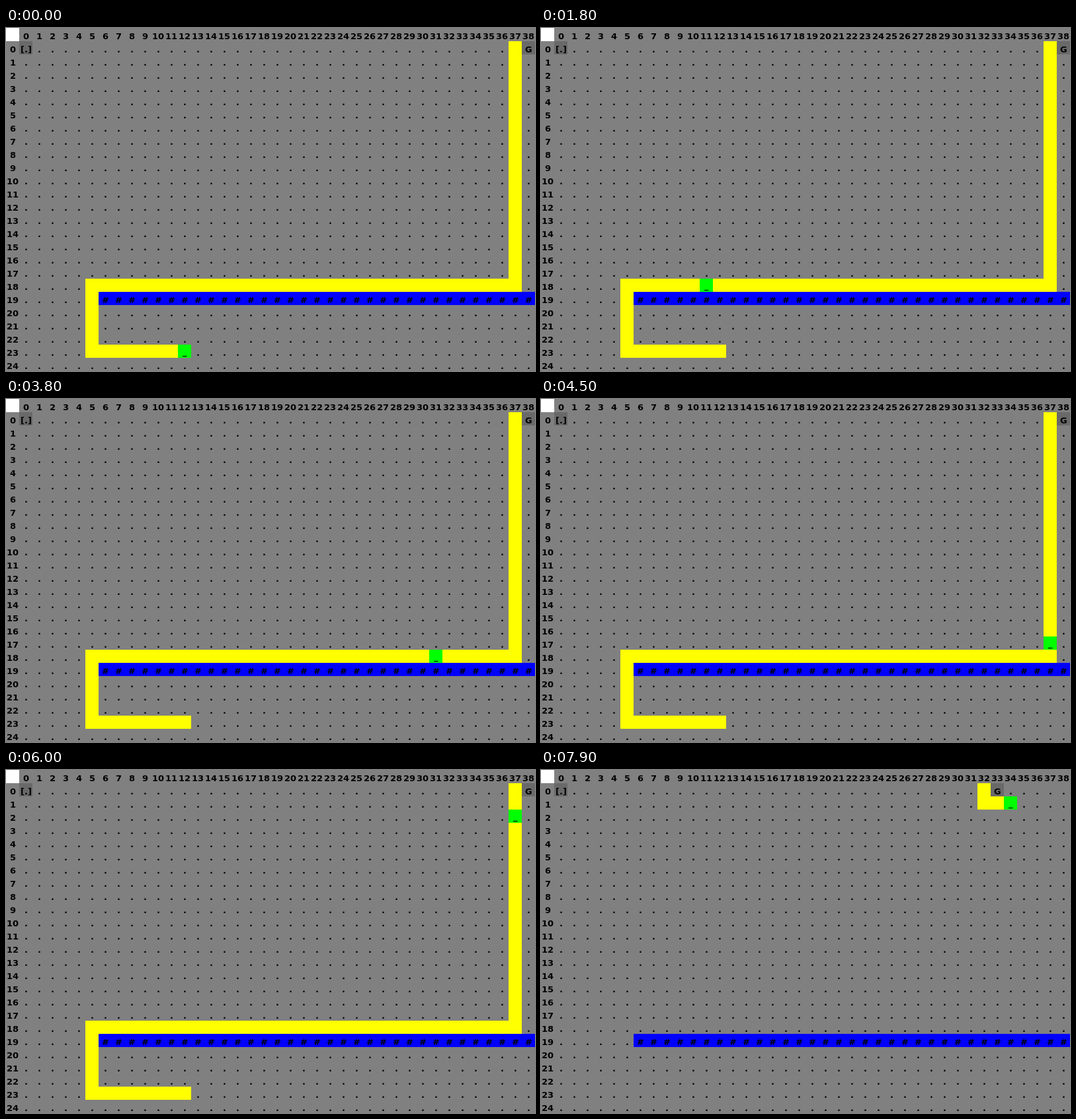
An HTML page with a canvas for the animation above (8 s loop, 800 px wide and 520 px high).

```html
<!DOCTYPE html>
<html>
<head>
<meta charset="utf-8">
<style>
html, body { margin: 0; width: 800px; height: 520px; overflow: hidden; }
canvas { display: block; }
</style>
</head>
<body>
<canvas id="stage" width="800" height="520"></canvas>
<script>
const ctx = document.getElementById('stage').getContext('2d');
const CELL = 20, COLS = 39, ROWS = 25, STEP = 100, STEPS = 80;
const WALL_ROW = 19, WALL_START = 6;

// Cells along straight segments between corner points.
function route(...corners) {
  const cells = [corners[0]];
  for (const [tx, ty] of corners.slice(1)) {
    let [x, y] = cells[cells.length - 1];
    while (x !== tx || y !== ty) {
      x += Math.sign(tx - x);
      y += Math.sign(ty - y);
      cells.push([x, y]);
    }
  }
  return cells;
}

const longRoute = route([12, 23], [5, 23], [5, 18], [37, 18], [37, 0]);

// The goal retreats one column each time its short detour is finished.
function sceneAt(step) {
  if (step < longRoute.length) return { path: longRoute, agent: step, goal: 38 };
  const rest = step - longRoute.length;
  const goal = 37 - Math.floor(rest / 4);
  return {
    path: route([goal + 1, 1], [goal - 1, 1], [goal - 1, 0]),
    agent: rest % 4,
    goal
  };
}

function fill(col, row, color, cols = 1, rows = 1) {
  ctx.fillStyle = color;
  ctx.fillRect((col + 1) * CELL, (row + 1) * CELL, cols * CELL, rows * CELL);
}

function label(text, col, row, lift = 0) {
  const width = Math.floor(ctx.measureText(text).width);
  const x = (col + 1) * CELL + Math.ceil((CELL - width) / 2);
  ctx.fillStyle = '#000';
  ctx.fillText(text, x, (row + 1) * CELL + 17 - lift);
}

function mark(text, col, row, color, lift) {
  fill(col, row, color);
  label(text, col, row, lift);
}

function draw(step) {
  const { path, agent, goal } = sceneAt(step);
  ctx.font = 'bold 13px "DejaVu Sans", sans-serif';
  fill(-1, -1, '#808080', COLS + 1, ROWS + 1);
  fill(-1, -1, '#fff');
  for (let c = 0; c < COLS; c++) label(String(c), c, -1);
  for (let r = 0; r < ROWS; r++) {
    label(String(r), -1, r);
    for (let c = 0; c < COLS; c++) {
      if (r === WALL_ROW && c >= WALL_START) mark('#', c, r, '#00f');
      else if (r || (c && c !== goal)) label('.', c, r);
    }
  }
  mark('[.]', 0, 0, '#696969');
  mark('G', goal, 0, '#696969');
  for (const [c, r] of path) fill(c, r, '#ff0');
  mark('_', ...path[agent], '#0f0', 2);
}

function frame(now) {
  draw(Math.floor(now / STEP) % STEPS);
  requestAnimationFrame(frame);
}
requestAnimationFrame(frame);
</script>
</body>
</html>
```
